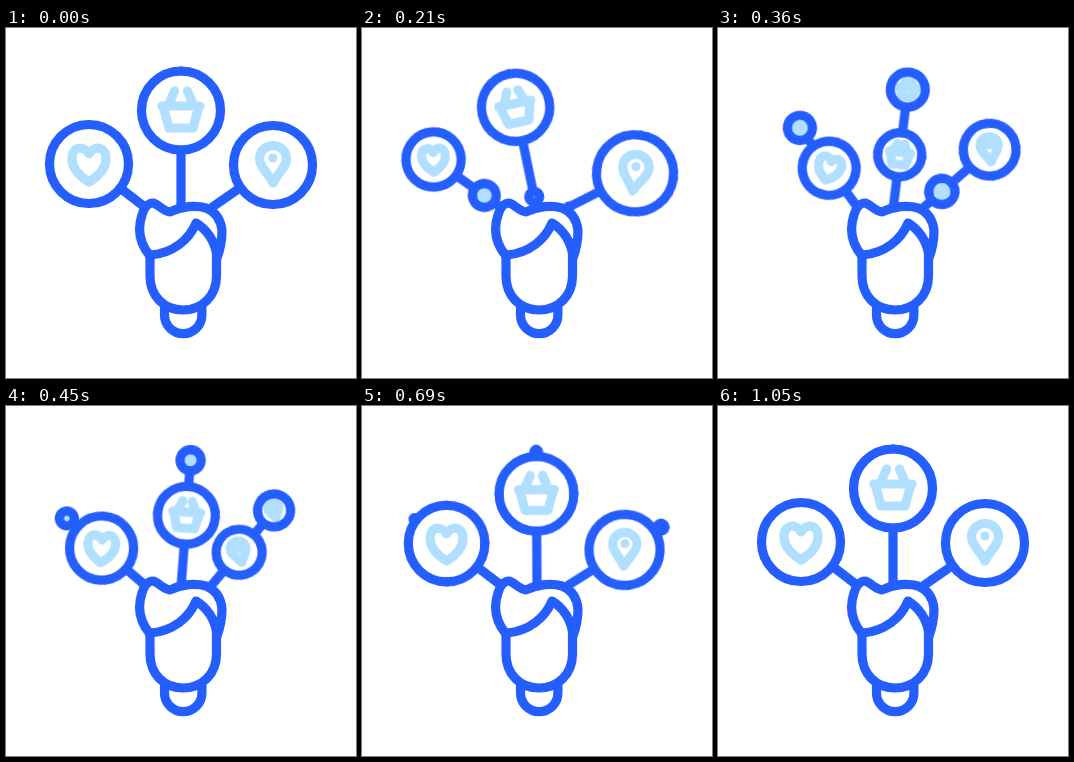
Recreate the animation shown at these times as an HTML page without scripts. Size 350x350 px, loop 1160 ms.

```html
<!DOCTYPE html>
<html lang="en">
<head>
<meta charset="utf-8">
<title>Customer interests</title>
<style>
  html, body { margin: 0; width: 100%; height: 100%; overflow: hidden; background: #fff; }
  svg { display: block; width: 100%; height: 100%; }

  .ink, .icon { fill: none; stroke: #255eff; stroke-width: 9.2; stroke-linecap: round; stroke-linejoin: round; }
  .icon { stroke: #b0dfff; }
  .ink, .icon { vector-effect: non-scaling-stroke; }
  .spoke { stroke-linecap: butt; }
  .paper { fill: #fff; }
  .solid { fill: #fff; }

  /* Each arm swings on its root; bubbles grow from the root and shrink into the tip. */
  .arm { transform-origin: var(--root); animation: 1160ms cubic-bezier(.37, 0, .63, 1) infinite; }
  .old, .new { animation: 1160ms var(--wait) infinite backwards; }
  .old { transform-origin: var(--tip); animation-name: shrink; }
  .new { transform-origin: var(--root); animation-name: grow; }

  .left   { --root: 140px 180px; --tip: 51.7px 111.9px; --wait: 0ms; animation-name: swing-left; }
  .middle { --root: 175px 182px; --tip: 175px 43.5px; --wait: 60ms; animation-name: swing-middle; }
  .right  { --root: 205px 180px; --tip: 299.4px 114.5px; --wait: 140ms; animation-name: swing-right; }

  @keyframes grow {
    0% { transform: scale(0); animation-timing-function: cubic-bezier(.33, 0, .16, 1); }
    77.6%, 100% { transform: scale(1); }
  }
  @keyframes shrink {
    0% { transform: scale(1); animation-timing-function: cubic-bezier(.33, 0, .16, 1); }
    77.6%, 100% { transform: scale(0); }
  }
  @keyframes swing-left {
    0% { transform: rotate(0deg); }
    10.9% { transform: rotate(-25deg); }
    25.5% { transform: rotate(20.5deg); }
    46.6% { transform: rotate(-4.5deg); }
    65.5% { transform: rotate(1deg); }
    86%, 100% { transform: rotate(0deg); }
  }
  @keyframes swing-middle {
    0%, 5.2% { transform: rotate(0deg); }
    17.7% { transform: rotate(-11.8deg); }
    33.4% { transform: rotate(8deg); }
    47.4% { transform: rotate(-3.2deg); }
    68.1% { transform: rotate(1.3deg); }
    88%, 100% { transform: rotate(0deg); }
  }
  @keyframes swing-right {
    0%, 11.2% { transform: rotate(0deg); }
    22.6% { transform: rotate(11.5deg); }
    36.8% { transform: rotate(-15.8deg); }
    57.8% { transform: rotate(2.8deg); }
    71.6% { transform: rotate(-1deg); }
    89.7%, 100% { transform: rotate(0deg); }
  }
</style>
</head>
<body>
<svg viewBox="0 0 350 350">
  <defs>
    <!-- The four nubs keep the ring solid when it is tiny. -->
    <g id="ring">
      <circle class="ink" r="39.5"/>
      <path class="ink" d="M39.5 0h.01M-39.5 0h.01M0 39.5h.01M0 -39.5h.01"/>
    </g>
    <g id="heart">
      <circle class="paper" cx="83" cy="136" r="39.5"/>
      <path class="icon" d="M83 126C79 118 66 117 66 131C66 142 75 149 83 154C91 149 100 142 100 131C100 117 87 118 83 126Z"/>
      <use href="#ring" x="83" y="136"/>
    </g>
    <g id="basket">
      <circle class="paper" cx="175" cy="82.5" r="39.5"/>
      <path class="icon" d="M156 78H194M157 78L163 100H187L193 78M168.5 63L162.5 77M181.5 63L187.5 77"/>
      <use href="#ring" x="175" y="82.5"/>
    </g>
    <g id="pin">
      <circle class="paper" cx="267" cy="137" r="39.5"/>
      <path class="icon" d="M267 155C262 145 253.5 139 253.5 130.5a13.5 13 0 0 1 27 0C280.500 139 272 145 267 155ZM267 130h.01"/>
      <use href="#ring" x="267" y="137"/>
    </g>
  </defs>

  <g class="arm left">
    <path class="ink spoke" d="M140 180L51.7 111.9"/>
    <g class="old"><use href="#heart"/></g>
    <g class="new"><use href="#heart"/></g>
  </g>
  <g class="arm middle">
    <path class="ink spoke" d="M175 182V43.5"/>
    <g class="old"><use href="#basket"/></g>
    <g class="new"><use href="#basket"/></g>
  </g>
  <g class="arm right">
    <path class="ink spoke" d="M205 180L299.4 114.5"/>
    <g class="old"><use href="#pin"/></g>
    <g class="new"><use href="#pin"/></g>
  </g>

  <g id="head">
    <path class="ink" d="M158.5 280V287a18.7 18.7 0 0 0 37.4 0V280"/>
    <path class="ink solid" d="M144 228V248C144 268 158 282 177 282S210.5 268 210.5 248V228"/>
    <path class="ink solid" d="M144 228C134 216 131 202 136 187C138 180 142 175 147 175C152 176 157 183 164 184C176 178 190 177 200 180C210 184 215 191 216 203C216 215 214 222 211 230C210 213 200 201 190 195C183 212 167 225 145 227"/>
  </g>
</svg>
</body>
</html>
```
